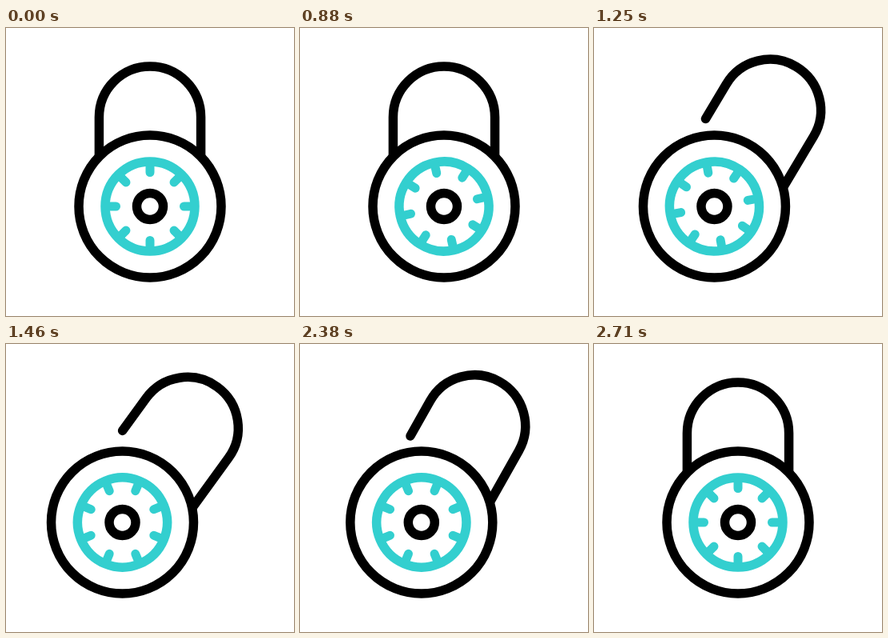
These frames come from a looping animation (360x360 px, 3000 ms). An HTML page:

```html
<!DOCTYPE html>
<html lang="en">
<head>
<meta charset="utf-8">
<title>Padlock</title>
<style>
  html, body { margin: 0; width: 100%; height: 100%; overflow: hidden; background: #fff; }
  svg { display: block; width: 100vw; height: 100vh; }
</style>
</head>
<body>
<svg viewBox="0 0 360 360" fill="none" stroke="#000" stroke-width="11.5" stroke-linecap="round">
  <g id="lock">
    <path id="shackle" d="M116.4 162V111.6a63.6 63.6 0 0 1 127.2 0V223"/>
    <circle cx="180" cy="223" r="89" fill="#fff"/>
    <g id="dial" stroke="#33cfcf">
      <circle cx="180" cy="223" r="56"/>
      <path id="ticks" stroke-width="11"/>
    </g>
    <circle cx="180" cy="223" r="16.5"/>
  </g>
</svg>
<script>
// All times below are in steps of 1/24 s.
const FPS = 24, LOOP = 3000, SLIDE = -34.5, TILT = 36, TURN = -292.5;
const [lock, shackle, dial, ticks] =
  ['lock', 'shackle', 'dial', 'ticks'].map(id => document.getElementById(id));

const polar = (r, a) => `${180 + r * Math.cos(a)} ${223 + r * Math.sin(a)}`;
ticks.setAttribute('d', Array.from({ length: 8 }, (_, i) =>
  `M${polar(54, i * Math.PI / 4)}L${polar(42.5, i * Math.PI / 4)}`).join(''));

const progress = (t, from, to) => Math.min(1, Math.max(0, (t - from) / (to - from)));
const easeOut = p => 1 - (1 - p) ** 2;
const easeInOut = p => p * p * (3 - 2 * p);

function draw(now) {
  const step = Math.floor((now % LOOP + 5) * FPS / 1000);
  const closing = progress(step, 49, 65);
  const open = easeOut(progress(step, 21.8, 35)) - closing ** 2.45;
  const turn = easeInOut(progress(step, 0.75, 34.1)) - closing ** 2.7;
  lock.setAttribute('transform', `translate(${SLIDE * open} 0)`);
  shackle.setAttribute('transform', `rotate(${TILT * open} 230.7 233.2)`);
  dial.setAttribute('transform', `rotate(${TURN * turn} 180 223)`);
}

let start;
function tick(now) {
  start ??= now;
  draw(now - start);
  requestAnimationFrame(tick);
}
draw(0);
requestAnimationFrame(tick);
</script>
</body>
</html>
```
